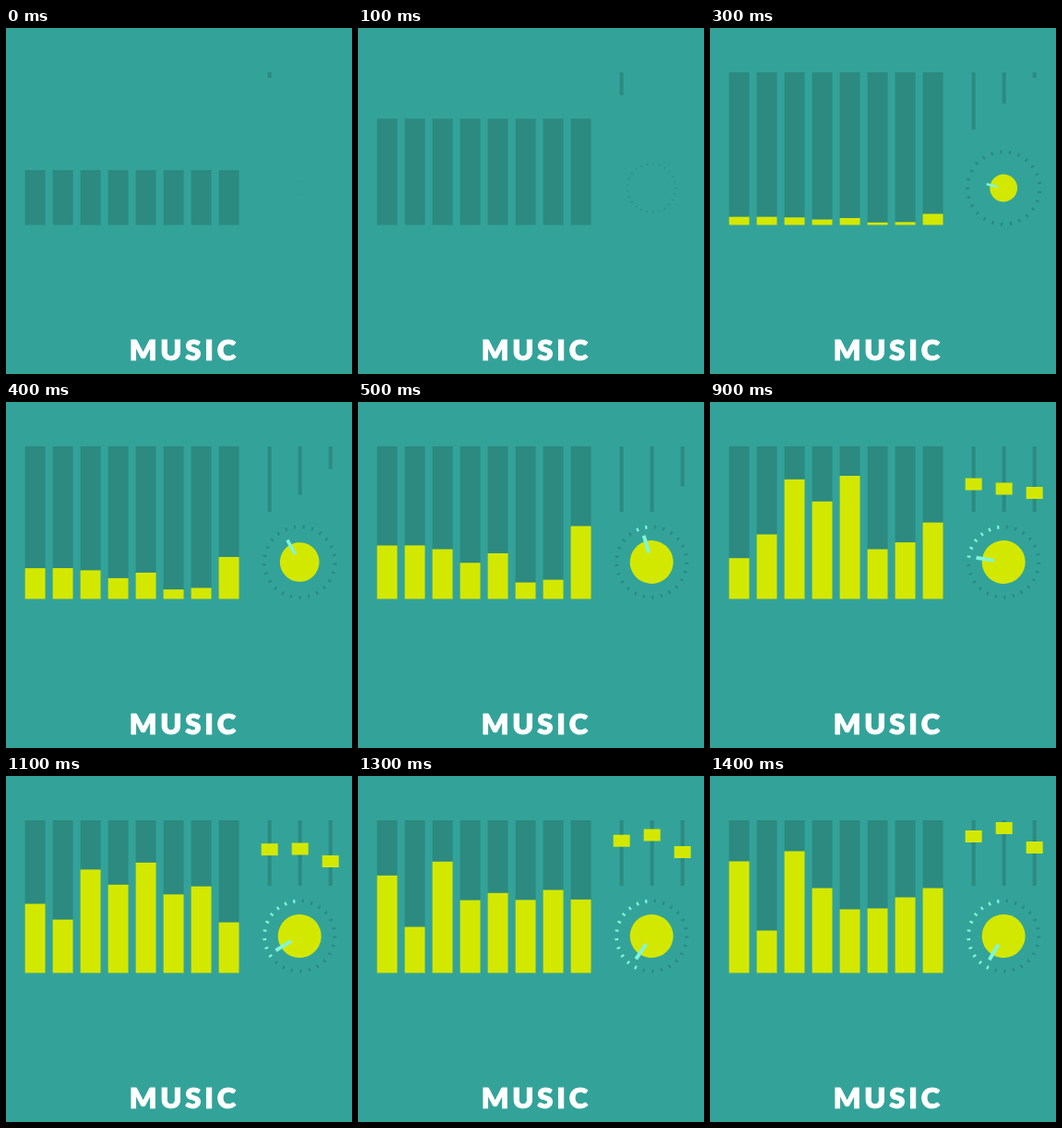
Animation, 375 px wide and 375 px high, one loop 1.5 s. Source, as an HTML page with a canvas:

```html
<!DOCTYPE html>
<html lang="en">
<head>
<meta charset="utf-8">
<title>Music</title>
<style>
  html, body { margin: 0; height: 100%; overflow: hidden; background: #33a39a; }
  canvas { display: block; width: 375px; height: 375px; }
</style>
</head>
<body>
<canvas id="stage" width="375" height="375"></canvas>
<script>
const ctx = document.getElementById('stage').getContext('2d');
const LOOP = 1500, STEP = 100, END = 1400, FLOOR = 213.5, TICKS = 25;
const BG = '#33a39a', DARK = '#2c8a80', LIME = '#d3e800', MINT = '#83f5d6';

// Each bar climbs to a first level, swings to a second, then settles.
const BARS = [
  { turn: 500, levels: [58, 32, 121] },
  { turn: 650, levels: [95, 63, 46] },
  { turn: 850, levels: [134, 106, 132] },
  { turn: 950, levels: [114, 75, 92] },
  { turn: 950, levels: [144, 92, 69] },
  { turn: 830, levels: [43, 93, 70] },
  { turn: 830, levels: [50, 102, 82] },
  { turn: 700, levels: [146, 45, 92] }
];
const THUMB_TRAVEL = [33, 42, 21];

const progress = (t, from, to) => Math.min(1, Math.max(0, (t - from) / (to - from)));
const mix = (a, b, k) => a + (b - a) * k;
const easeOut = k => k * (2 - k);
const easeInOut = k => (1 - Math.cos(Math.PI * k)) / 2;

function rect(color, x, y, w, h) {
  ctx.fillStyle = color;
  ctx.fillRect(x, y, w, h);
}

// Runs draw() in a frame centred on the dial, scaled and turned.
function onDial(scale, degrees, draw) {
  ctx.save();
  ctx.translate(318.2, 173.5);
  ctx.scale(scale, scale);
  ctx.rotate(degrees * Math.PI / 180);
  draw();
  ctx.restore();
}

function barLevel({ turn, levels: [first, second, last] }, t) {
  const back = turn + 320;
  if (t < turn) return first * progress(t, 264, turn);
  if (t < back) return mix(first, second, progress(t, turn, back));
  return mix(second, last, progress(t, back, END));
}

function drawBars(t) {
  const track = mix(59.5, 165.5, progress(t, 0, 190));
  BARS.forEach((bar, i) => {
    const x = 20.6 + 30 * i, level = barLevel(bar, t);
    rect(DARK, x, FLOOR - track, 22, track);
    rect(LIME, x, FLOOR - level, 22, level);
  });
}

function drawSliders(t) {
  THUMB_TRAVEL.forEach((travel, i) => {
    const x = 285.7 + 33 * i, local = t - 150 * i;
    const y = 98.5 - travel * progress(t, 700 + 140 * i, END);
    if (local >= 0) rect(DARK, x - 2, 48, 4, Math.min(71, 6 + local * .187));
    if (local >= 540) rect(LIME, x - 9, y - 6.5, 18, 13);
  });
}

function drawDial(t) {
  const grow = easeOut(progress(t, 170, 500));
  const hand = -13 - 175 * (1 - grow) - 136 * easeInOut(progress(t, 400, END));
  const ringScale = easeOut(progress(t, -30, 300)) * (1.08 - .08 * grow);

  ctx.globalAlpha = mix(.4, 1, progress(t, 0, 250));
  for (let i = 0; i < TICKS; i++) {
    const angle = -9 + 13 * (1 - grow) - 360 / TICKS * i;
    const lit = grow === 1 && angle > hand - 9.3;
    onDial(ringScale, angle, () => rect(lit ? MINT : DARK, -1.1, -40, 2.2, 3.8));
  }
  ctx.globalAlpha = 1;

  onDial(grow, hand, () => {
    ctx.fillStyle = LIME;
    ctx.beginPath();
    ctx.arc(0, 0, 23.5, 0, 7);
    ctx.fill();
    rect(MINT, -2, -30, 4, 19.5);
  });
}

function drawTitle() {
  ctx.font = '900 31px Lato, sans-serif';
  ctx.letterSpacing = '3.8px';
  ctx.textAlign = 'center';
  ctx.fillStyle = ctx.strokeStyle = '#fff';
  ctx.fillText('MUSIC', 193.3, 360.4);
  ctx.strokeText('MUSIC', 193.3, 360.4);
}

function frame() {
  const t = Math.floor(performance.now() % LOOP / STEP) * STEP;
  rect(BG, 0, 0, 375, 375);
  drawBars(t);
  drawSliders(t);
  drawDial(t);
  drawTitle();
  requestAnimationFrame(frame);
}
frame();
</script>
</body>
</html>
```
